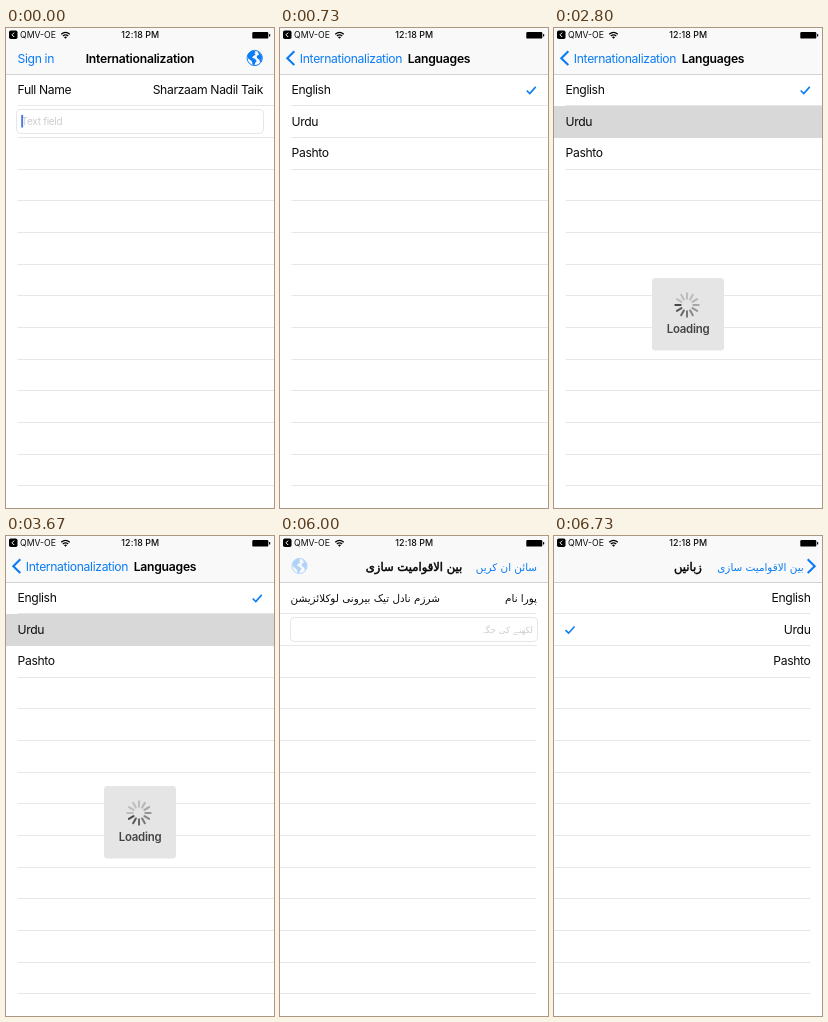
Animation of 268 by 480 pixels, one loop 6.99 s. Source, as an HTML page:

```html
<!DOCTYPE html>
<html lang="en">
<head>
<meta charset="utf-8">
<title>Language switch</title>
<style>
  html, body { margin: 0; width: 100%; height: 100%; overflow: hidden; background: #fff; }
  svg { display: block; width: 268px; height: 480px; }
  text { font: 12.15px Inter, sans-serif; letter-spacing: -.028em; white-space: pre; }
  .bold { font-weight: 600; letter-spacing: -.019em; }
  .field { font-size: 10px; letter-spacing: -.028em; }
  .status { font-size: 8.7px; letter-spacing: 0; }
  .clock { font-size: 8.9px; font-weight: 500; letter-spacing: .01em; }
  .hud { font-size: 11.4px; font-weight: 600; letter-spacing: -.02em; }
  .ur { font: 10.4px "DejaVu Sans", sans-serif; letter-spacing: 0; }
  .ur.bold { font-size: 11.6px; stroke: #000; stroke-width: .45px; }
  .ur.field { font-size: 8.7px; }
</style>
</head>
<body>
<svg viewBox="0 0 268 480">
  <defs>
    <linearGradient id="shade">
      <stop offset="0" stop-opacity="0"/>
      <stop offset="1" stop-opacity=".16"/>
    </linearGradient>
  </defs>
  <g id="stage"></g>
</svg>
<script>
const LOOP = 6990, W = 268, H = 480, PUSH = 532;
const BLUE = '#0a7cf5', HINT = '#cdcdd2';
const FIRST_PUSH = [330, 470, 600, 730];
const SECOND_PUSH = [6200, 6330, 6470, 6530, 6670, 6730];

const EN = {
  cls: '', title: 'Internationalization', signIn: 'Sign in', label: 'Full Name',
  name: 'Sharzaam Nadil Taik', hint: 'Text field', languages: 'Languages',
  backX: 71, titleX: 159, chosen: 0,
};
const UR = {
  cls: 'ur ', title: 'بین الاقوامیت سازی', signIn: 'سائن ان کریں', label: 'پورا نام',
  name: 'شرزم نادل تیک بیرونی لوکلائزیشن', hint: 'لکھنے کی جگہ', languages: 'زبانیں',
  backX: 206.5, titleX: 134, chosen: 1, rtl: true,
};

const rowY = k => 46 + 31.69 * k;
const rect = (x, y, w, h, fill, more = '') =>
  `<rect x="${x}" y="${y}" width="${w}" height="${h}" fill="${fill}" ${more}/>`;
const stroke = (d, width, color = BLUE, more = '') =>
  `<path d="${d}" fill="none" stroke="${color}" stroke-width="${width}" ${more}/>`;
const group = (content, x = 0, y = 0, opacity = 1) =>
  `<g transform="translate(${x} ${y})" opacity="${opacity}">${content}</g>`;
const text = (str, x, y, cls = '', anchor = 'start', fill = '#0c0c0c', opacity = 1) =>
  `<text x="${x}" y="${y}" class="${cls}" text-anchor="${anchor}" fill="${fill}" opacity="${opacity}">${str}</text>`;

// cubic-bezier(.25, .1, .25, 1)
function ease(u) {
  if (u <= 0 || u >= 1) return u <= 0 ? 0 : 1;
  let lo = 0, hi = 1;
  for (let i = 0; i < 24; i++) {
    const s = (lo + hi) / 2;
    if (.75 * s * (1 - s) + s ** 3 < u) lo = s; else hi = s;
  }
  return .3 * lo * (1 - lo) ** 2 + 3 * lo * lo * (1 - lo) + lo ** 3;
}

function pushProgress(t, steps) {
  const shown = steps.filter(s => s <= t).pop();
  return shown === undefined ? 0 : ease((shown - steps.at(-1) + PUSH) / PUSH);
}

function lines(rtl) {
  let out = rect(0, 46, W, H - 46, '#fff');
  for (let k = 1; k <= 13; k++)
    out += rect(rtl ? 0 : 11.5, Math.floor(rowY(k)), 256.5, 1, '#e7e7e9');
  return out;
}

function homePage(L) {
  const [start, end] = L.rtl ? ['end', 'start'] : ['start', 'end'];
  const left = L.rtl ? 257 : 11.5, right = L.rtl ? 10.5 : 257;
  return lines(L.rtl) +
    text(L.label, left, 66, L.cls, start) +
    text(L.name, right, 66, L.cls, end) +
    rect(10.5, 81.5, 247, 24, '#fff', 'rx="4" stroke="#e6e6e6"') +
    text(L.hint, L.rtl ? 253 : 15.6, 97, L.cls + 'field', start, HINT) +
    (L.rtl ? '' : rect(15.2, 87, 1.9, 12.5, '#4a78e0'));
}

function languagePage(L, pressed) {
  const check = stroke('M0 .6L3.1 3.6L9 -3', 1.6);
  return lines(L.rtl) +
    (pressed ? rect(0, 78, W, 32, '#d8d8d8') : '') +
    ['English', 'Urdu', 'Pashto'].map((name, k) =>
      text(name, L.rtl ? 256.5 : 11.5, rowY(k) + 20, '', L.rtl ? 'end' : 'start')).join('') +
    group(check, L.rtl ? 11.5 : 246.7, rowY(L.chosen) + 15.9);
}

function pages(L, p, pressed) {
  if (p === 0) return homePage(L);
  if (p === 1) return languagePage(L, pressed);
  const side = L.rtl ? -1 : 1, x = side * W * (1 - p);
  const shadow = L.rtl
    ? rect(-W - 5, 46, 5, H, 'url(#shade)', 'transform="scale(-1 1)"')
    : rect(-5, 46, 5, H, 'url(#shade)');
  return group(homePage(L), -side * 80 * p) +
    rect(0, 46, W, H, '#000', `opacity="${.11 * p}"`) +
    group(shadow + languagePage(L), x);
}

const globe =
  `<circle r="7.6" fill="none" stroke="${BLUE}" stroke-width="1"/>` +
  `<path fill="${BLUE}" d="M-7 -3Q-5 -6.6 -1 -7.4L1 -6L-.4 -4.8L1 -3.6L-1.6 -1.8L-2.6 -.2L.2 .8L2 3L.4 5L-.2 7.2L-2.2 6.6L-2.6 3.8L-4.6 1.8L-6.6 .4Z` +
  `M2.6 -6.8Q6.2 -5.2 7.3 -1.6L6.8 2.6L5.4 4.4L4.6 1.4L2.4 .2L2 -2L4.4 -3.6Z"/>`;

function navBar(L, p, globeAlpha) {
  const side = L.rtl ? -1 : 1, anchor = L.rtl ? 'end' : 'start';
  const fade = (1 - p) ** 2;
  const slide = (L.backX - 134) * p;
  const newX = L.titleX + side * 168 * (1 - p);
  const chevron = L.rtl ? 'M253.7 23.3L260.7 30.2L253.7 37.1' : 'M14.3 23.3L7.3 30.2L14.3 37.1';
  return rect(0, 0, W, 46, '#f9f9f9') + rect(0, 46, W, 1, '#d2d2d4') +
    text(L.signIn, L.rtl ? 257 : 11.5, 34.6, L.cls, anchor, BLUE, fade) +
    group(globe, L.rtl ? 19.5 : 248.7, 30, fade * fade * globeAlpha) +
    text(L.title, 134 + slide * .82, 34.6, L.cls + 'bold', 'middle', '#000', fade) +
    text(L.title, 134 + slide, 34.6, L.cls, 'middle', BLUE, p) +
    text(L.languages, newX, 34.6, L.cls + 'bold', 'middle', '#000', p) +
    stroke(chevron, 2.1, BLUE, `opacity="${p ** 4}"`);
}

const statusBar =
  rect(3, 2.5, 8.5, 8.5, '#000', 'rx="1.8"') +
  stroke('M8.2 4.6L6 6.8L8.2 9', 1, '#fff') +
  text('QMV-OE', 14, 10.3, 'status') +
  stroke('M55.2 6.3Q59.5 2.4 63.8 6.3M56.8 8Q59.5 5.6 62.2 8', 1.2, '#000') +
  '<path d="M58 9.2Q59.5 8 61 9.2L59.5 10.8Z"/>' +
  text('12:18 PM', 134.3, 10.3, 'clock', 'middle') +
  rect(246.3, 4, 16, 6.6, '#000', 'rx="1.2"') + rect(263, 6, 1.2, 2.6, '#000', 'rx=".5"');

function loadingBox(t, opacity) {
  const head = Math.floor(t / (1000 / 12)) % 12;
  let petals = '';
  for (let i = 0; i < 12; i++) {
    const age = (head - i + 12) % 12;
    petals += stroke('M0 -6.3V-11.7', 2, '#484848',
      `stroke-linecap="round" opacity="${Math.max(.25, 1 - age * .1)}" transform="rotate(${i * 30})"`);
  }
  return group(rect(98, 250, 72, 72.5, '#e5e5e5', 'rx="3.5"') + group(petals, 133, 277) +
    text('Loading', 134, 305, 'hud', 'middle', '#444'), 0, 0, opacity);
}

function scene(t) {
  const L = t < 3870 ? EN : UR;
  const p = pushProgress(t, L.rtl ? SECOND_PUSH : FIRST_PUSH);
  const globeAlpha = t >= 6000 && t < 6200 ? .3 : 1;
  const hud = t < 1800 || t >= 3930 ? 0 : t < 1870 || t >= 3870 ? .5 : 1;
  return pages(L, p, !L.rtl && t >= 1730) + navBar(L, p, globeAlpha) + statusBar +
    (hud ? loadingBox(t, hud) : '');
}

const stage = document.getElementById('stage');
const begin = performance.now();
let last = -1;
function draw() {
  const t = (performance.now() - begin) % LOOP;
  const tick = Math.floor((t + 4) / (200 / 3));
  if (tick !== last) {
    last = tick;
    stage.innerHTML = scene(Math.round(tick * 20 / 3) * 10);
  }
  requestAnimationFrame(draw);
}
draw();
</script>
</body>
</html>
```
